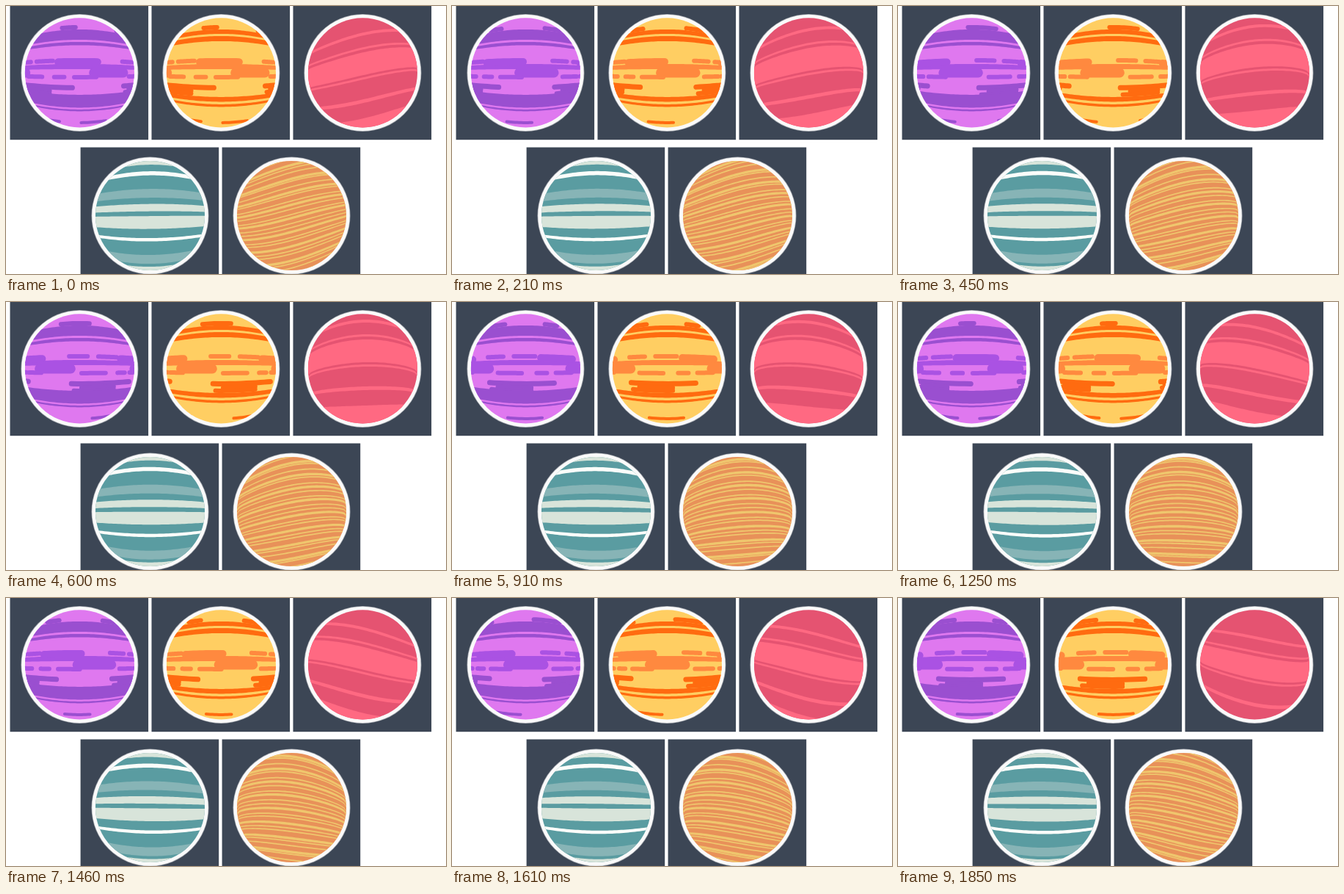
Write an HTML page with a canvas that moves like this. It is 600 px wide and 365 px high and loops after 1.93 s.

```html
<!DOCTYPE html>
<html lang="en">
<head>
<meta charset="utf-8">
<title>Five spinning planets</title>
<style>
html, body { margin: 0; width: 100%; height: 100%; overflow: hidden; background: #fff; }
canvas { display: block; width: 600px; height: 365px; }
</style>
</head>
<body>
<canvas id="stage" width="600" height="365"></canvas>
<script>
const ctx = document.getElementById('stage').getContext('2d');
const LOOP = 1930;
const STEP = LOOP / 25; // the picture advances in even steps
const LEAD = 24;        // the first step is shorter by this much
const R = 74.6;
const RAD = Math.PI / 180;
const LAP = 134;        // degrees after which the streaks repeat

// Rotation in degrees; the streaks hurry at the end of the loop
const spin = t => -0.105 * t - 0.15 * Math.max(0, t - 1610);

const flat = () => 0;
const wave = (height, crest) => lon => -height * Math.cos((lon - crest) * RAD);

// Longitude and height on the texture to a point on the disc
function project(lon, v, bend) {
  const u = Math.sin(lon * RAD);
  return [u * R, (v + bend(lon)) * (1 - 0.18 * u * u)];
}

function band(top, bottom, color, bend = flat) {
  const n = 48;
  const edge = (i, v) => ctx.lineTo(...project(Math.asin(i / n * 2 - 1) / RAD, v, bend));
  ctx.beginPath();
  for (let i = 0; i <= n; i++) edge(i, top);
  for (let i = n; i >= 0; i--) edge(i, bottom);
  ctx.fillStyle = color;
  ctx.fill();
}

// A rounded streak between two longitudes, repeated every lap
function pill(v, size, from, to, color, turn) {
  const inset = size / 2 / R / RAD;
  ctx.strokeStyle = color;
  ctx.lineWidth = size;
  ctx.lineCap = ctx.lineJoin = 'round';
  for (let lap = -2; lap <= 2; lap++) {
    const shift = turn % LAP + lap * LAP;
    const a = Math.max(-90, from + shift + inset);
    const b = Math.min(90, to + shift - inset);
    if (a >= b) continue;
    ctx.beginPath();
    for (let i = 0; i <= 12; i++) ctx.lineTo(...project(a + (b - a) * i / 12, v, flat));
    ctx.stroke();
  }
}

function streaks(mid, dark, t) {
  const turn = spin(t);
  const put = (v, size, from, to, color) => pill(v, size, from, to, color, turn);

  put(-62, 6, -21, -2, dark);
  put(-62, 6, 40, 75, dark);

  // Middle belt: a solid core with loose streaks above and below
  band(-12, -5, mid);
  put(-17, 6, -85, -61, mid);
  put(-17, 6, -54, -27, mid);
  put(-15, 10, -27, 23, mid);
  put(0, 13, 10, 58, mid);
  put(6, 6, -72, -41, mid);
  put(6, 6, -30, -14, mid);
  put(6, 6, -8, 20, mid);

  // Lower belt
  put(20.5, 7, -83, -5, dark);
  put(26, 7, -72, -31, dark);
  put(30, 6, -80, -31, dark);

  put(68, 4, -60, -20, dark);
  put(68, 4, 0, 30, dark);
}

function purple(t) {
  const dark = '#9a4fd0';
  band(-80, 80, '#df78ef');
  band(-59, -45, dark);
  band(-42, -37.5, dark);
  streaks('#aa52e3', dark, t);
  band(30, 47.5, dark);
  band(50, 52.5, dark);
}

function orange(t) {
  const dark = '#ff6b10';
  band(-80, 80, '#ffce62');
  band(-59, -53, dark);
  band(-50, -43, dark);
  streaks('#ff893f', dark, t);
  band(33, 39.5, dark);
  band(43, 46.5, dark);
}

function pink(t) {
  const light = '#ff6982', bend = wave(18, 72 - 0.107 * t);
  const stripe = (v, size) => band(v, v + size, light, bend);
  band(-110, 110, '#e55371', bend);
  stripe(-49, 4);
  stripe(-29, 3);
  stripe(-22, 31);
  stripe(12, 3);
  stripe(42, 5);
  stripe(68, 40);
}

function teal(t) {
  const light = '#d8e4da', mid = '#87b4b6', white = '#fbfdfa';
  const bend = wave(0.8, 60 - 0.105 * t);
  band(-85, 85, '#5a9ca1', bend);
  band(-85, -69, light, bend);
  band(-60, -54.5, white, bend);
  band(-36, -24, mid, bend);
  band(-15.5, -5.5, light, bend);
  band(1, 18.5, light, bend);
  band(31, 35.5, white, bend);
  band(54, 66, mid, bend);
  band(70, 76, light, bend);
}

function brown(t) {
  const bend = wave(20, 95 - 0.085 * t);
  band(-110, 110, '#e89159', bend);
  for (let i = 0; i < 30; i++) {
    const v = -92 + 6.2 * i + 1.2 * Math.sin(i * 2.4);
    band(v, v + (i % 3 ? 1.8 : 3.4), '#efc66d', bend);
  }
}

function disc(radius, color) {
  ctx.beginPath();
  ctx.arc(0, 0, radius, 0, 7);
  ctx.fillStyle = color;
  ctx.fill();
}

function tile(x, y, paint, t) {
  ctx.save();
  ctx.translate(x, y);
  ctx.fillStyle = '#3c4655';
  ctx.fillRect(0, 0, 188.6, 182.2);
  ctx.translate(94.9, 90.9);
  if (y) ctx.translate(0, 2.1);
  disc(80, '#a9adb3');
  disc(79.2, '#fafafa');
  ctx.beginPath();
  ctx.arc(0, 0, R, 0, 7);
  ctx.clip();
  paint(t);
  ctx.restore();
}

function draw(t) {
  ctx.fillStyle = '#fff';
  ctx.fillRect(0, 0, 600, 365);
  [purple, orange, pink].forEach((paint, i) => tile(5.5 + 193 * i, 0, paint, t));
  [teal, brown].forEach((paint, i) => tile(101.6 + 193 * i, 192.5, paint, t));
}

const start = performance.now();
let shown = -1;

function loop() {
  const now = (performance.now() - start) % LOOP;
  const step = Math.floor((now + LEAD) / STEP) % 25;
  if (step !== shown) {
    shown = step;
    draw(Math.max(0, step * STEP - LEAD));
  }
  requestAnimationFrame(loop);
}
loop();
</script>
</body>
</html>
```
